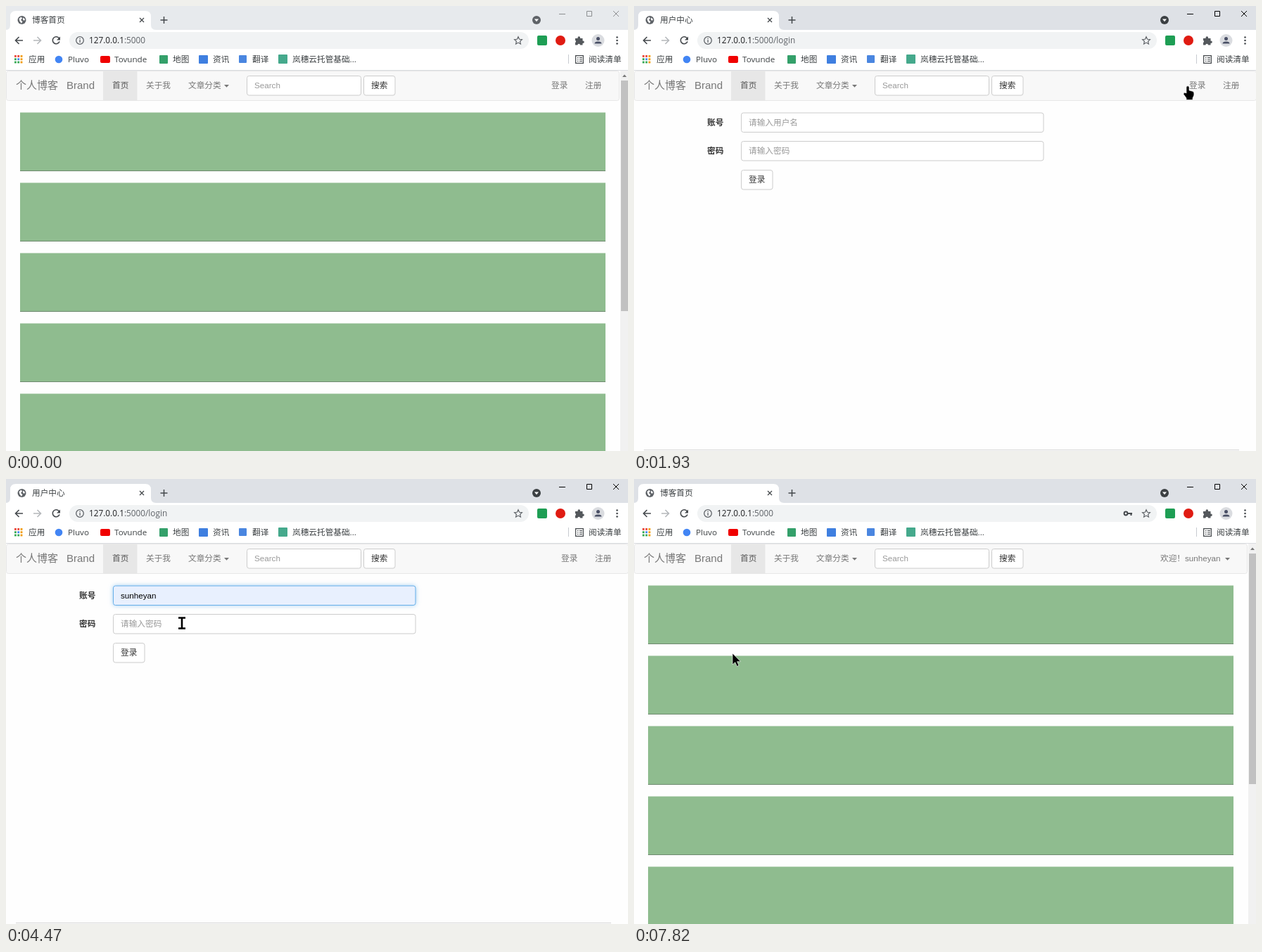
Recreate the animation shown at these times as an HTML page. Size 884 by 633 pixels, loop 8 s.

```html
<!DOCTYPE html>
<html lang="zh-CN">
<head>
<meta charset="utf-8">
<style>
html, body { margin: 0; width: 100%; height: 100%; overflow: hidden; background: #fff; }
svg { display: block; }
text { font: 11.67px "Liberation Sans", "Noto Sans CJK SC", "Noto Sans CJK", sans-serif; fill: #777; white-space: pre; }
.ui { font-family: "Open Sans", "Noto Sans CJK SC", "Noto Sans CJK", sans-serif; fill: #3c4043; }
</style>
</head>
<body>
<svg id="stage" width="884" height="633" viewBox="0 0 884 633"></svg>
<script>
const LOOP = 8000;
const USERS = ['30718264905', 'sunheyan', 'sunheli'];

const rect = (x, y, w, h, fill, more = '') =>
  `<rect x="${x}" y="${y}" width="${w}" height="${h}" fill="${fill}" ${more}/>`;
const dot = (x, y, r, fill, more = '') => `<circle cx="${x}" cy="${y}" r="${r}" fill="${fill}" ${more}/>`;
const fill = (d, color, more = '') => `<path d="${d}" fill="${color}" ${more}/>`;
const line = (d, color, w = 1, more = '') =>
  `<path d="${d}" fill="none" stroke="${color}" stroke-width="${w}" ${more}/>`;
const text = (x, y, s, style = '', more = '') => `<text x="${x}" y="${y}" style="${style}" ${more}>${s}</text>`;
const ui = (x, y, s, style = '', more = '') => text(x, y, s, style, 'class="ui" ' + more);
const group = (id, body, more = '') => `<g id="${id}" ${more}>${body}</g>`;
const box = (x, y, w, h, more = '') =>
  rect(x + .5, y + .5, w - 1, h - 1, '#fff', `rx="3" stroke="#ccc" ${more}`);
const caretDown = x => fill(`M${x} 112h7l-3.5 3.7z`, '#777');

function tabStrip() {
  return rect(0, 0, 884, 34, '#dee1e6', 'id="strip"') +
    fill('M0 34Q6 34 6 27V15Q6 7 14 7H198Q206 7 206 15V27Q206 34 213 34Z', '#fff') +
    group('globe', dot(22.5, 20, 6, '#5f6368') +
      fill('M18.5 18l3-2.5 1.5 2-2 2.5 2.5 2-1.5 2.8-2.5-3zM24 16.5l3 2-1 2.5-2-1.5z', '#fff')) +
    line('M0-6A6 6 0 0 1 5 -3', '#8ab4f8', 1.6, 'id="spinner"') +
    ui(37, 24, '', '', 'id="title"') +
    line('M190 17l6 6m0-6l-6 6', '#45494d', 1.3) +
    line('M219.500 20h10m-5-5v10', '#45494d', 1.5) +
    group('winmenu', dot(754, 20, 6) + fill('M751 18.500h6l-3 3.700z', '#fff')) +
    group('controls', line('M786 11.500h9M825.500 7.500h7v7h-7zM863 7l8 8m0-8l-8 8', 'currentColor'));
}

function toolbar() {
  const ink = '#45494d';
  const puzzle = 'M809 46h3.500v-1a1.800 1.800 0 0 1 3.600 0v1h3.400v3.500h.5a1.800 1.800 0 0 1 0 3.600h-.5v2.400h-3.500a1.800 1.800 0 0 0-3.600 0h-3.400v-3.500a1.800 1.800 0 0 0 0-3.200z';
  return rect(0, 34, 884, 57, '#fff') +
    line('M24 49H13.500m5-5l-5 5 5 5', ink, 1.6) +
    line('M39 49h10.500m-5-5l5 5-5 5', '#b5b8bb', 1.6) +
    group('reload', line('M75.500 46A5 5 0 1 0 76 50.500', ink, 1.6) + fill('M77 43.500v5h-5z', ink)) +
    line('M67 44.500l9 9m0-9l-9 9', ink, 1.6, 'id="stop"') +
    rect(90, 37, 653, 24, '#f1f3f4', 'rx="12"') +
    dot(105, 49, 5.3, 'none', 'stroke="#5f6368" stroke-width="1.3"') +
    rect(104.4, 48, 1.3, 4, '#5f6368') + rect(104.4, 45.7, 1.3, 1.4, '#5f6368') +
    `<text x="118" y="53" class="ui" style="font-size:11.8px;fill:#202124">127.0.0.1<tspan fill="#5f6368" id="path"></tspan></text>` +
    group('key', dot(699, 49, 2.4, 'none', `stroke="${ink}" stroke-width="2"`) +
      line('M702 49h6m-1.500 0v3', ink, 2)) +
    line('M728 43.800l1.600 3.500 3.800.4-2.800 2.600.8 3.800-3.400-2-3.400 2 .8-3.800-2.800-2.600 3.800-.4z', '#5f6368', 1.2) +
    rect(755, 42, 14, 14, '#1e9e54', 'rx="2"') + dot(788, 49, 7, '#e01b12') +
    fill(puzzle, '#54585c') + dot(841.5, 49, 9, '#dadce0') + dot(841.5, 46.5, 2.5, '#4a5066') +
    fill('M836.500 53.500q0-3 5-3t5 3z', '#4a5066') +
    [44.5, 49, 53.5].map(y => dot(868.5, y, 1.3, ink)).join('');
}

function bookmarks() {
  const hues = ['#ea4335', '#ea4335', '#f29900', '#34a853', '#4285f4', '#f29900', '#34a853', '#34a853', '#f29900'];
  const apps = hues.map((c, i) => rect(12 + i % 3 * 4.3, 70 + (i / 3 | 0) * 4.3, 2.8, 2.8, c)).join('');
  const names = [[32, '应用'], [88, 'Pluvo'], [154, 'Tovunde'], [237, '地图'], [294, '资讯'], [350, '翻译'],
    [407, '岚穗云托管基础...'], [828, '阅读清单']];
  return apps + dot(75, 76, 5.3, '#4285f4') + rect(134, 71, 14, 10, '#f00000', 'rx="2"') +
    rect(218, 70, 12, 12, '#34a06a', 'rx="1"') + rect(274, 70, 13, 12, '#3f7fe0', 'rx="1"') +
    rect(331, 70, 11, 11, '#4a86e0', 'rx="1"') + rect(387, 69, 13, 13, '#45a98c', 'rx="1"') +
    names.map(([x, s]) => ui(x, 80, s)).join('') +
    line('M799.500 69v13', '#c8cbd0') +
    line('M809.600 70.600h10.800v10.800h-10.800zM812 73.500h1.500m1.500 0h4M812 76h1.500m1.500 0h4M812 78.500h1.500m1.500 0h4', '#45494d', 1.2) +
    rect(0, 91, 884, 1, '#dadce0');
}

function navbar() {
  const big = 'font-size:15px';
  return rect(.5, 92.5, 871, 42, '#f8f8f8', 'rx="3" stroke="#e7e7e7" id="bar"') +
    rect(138, 92, 48.5, 42, '#e7e7e7') +
    text(14, 118, '个人博客', big) + text(86, 118, 'Brand', big) +
    text(151, 117, '首页', 'fill:#555') + text(199, 117, '关于我') + text(259, 117, '文章分类') + caretDown(310) +
    box(342, 99, 163, 28.5) + text(353, 117, 'Search', 'fill:#999') +
    box(508, 99, 45.5, 28.5) + text(519, 117, '搜索', 'fill:#333') +
    group('guest', text(775, 117, '登录', '', 'id="signin"') + text(823, 117, '注册')) +
    group('member', text(748, 117, '欢迎！' + USERS[1]) + caretDown(840));
}

function homePage() {
  let s = '';
  for (let y = 151.5; y < 633; y += 100)
    s += rect(20, y, 832, 83, '#8fbc8f') + rect(20, y + 82.5, 832, 1, '#6f8a70');
  return s + rect(873, 92, 11, 541, '#f1f1f1') + rect(874, 106, 10, 328, '#c1c1c1') +
    fill('M876 101h6l-3-3.500z', '#777');
}

function loginPage() {
  const bold = 'font-weight:bold;fill:#333';
  const rows = USERS.map((u, i) => rect(151.5, 187 + i * 30, 160, 30, '#e8e8e8', `id="row${i}"`) +
    ui(162, 207 + i * 30, u, 'font-size:12.6px;fill:#202124')).join('');
  return rect(14, 631, 846, 1, '#d4d4d4') +
    text(104, 170, '账号', bold) + text(104, 210, '密码', bold) +
    box(152, 151.5, 430.5, 28.5, 'id="account"') + text(163, 170, '', '', 'id="user"') +
    ui(163, 170, '', 'font-size:10.5px', 'id="preview"') +
    box(152, 192, 430.5, 28.5, 'id="secret"') + text(163, 210, '请输入密码', 'fill:#999', 'id="hint"') +
    group('dots', [0, 1, 2, 3, 4, 5].map(i => dot(165 + i * 4.1, 206.5, 1.45, '#444')).join('')) +
    rect(163, 0, 1, 13, '#000', 'id="caret"') +
    box(152, 233, 45.5, 28.5, 'id="button"') + text(163, 251, '登录', 'fill:#333') +
    rect(154.5, 235.5, 40.5, 23.5, 'none', 'rx="2" stroke="#000" stroke-width="2" id="ring"') +
    group('menu', rect(151, 180.5, 160.5, 104, '#fff', 'rx="2" style="filter:drop-shadow(0 1px 2px #0006)"') + rows);
}

function pointers() {
  const edge = 'stroke="#fff" stroke-width=".6"';
  return group('arrow', fill('M0 0V16L3.800 12.700 6.400 18.500 9 17.300 6.500 11.700H11.500Z', '#000', edge)) +
    group('hand', fill('M-2 1Q0-1.500 2 1V6L7.500 7.500Q9.500 9 8.800 13L7 17V19.500H-2V17L-6 11.500Q-6 8-2 10Z', '#000', edge)) +
    group('beam', line('M-5-7.500H5M-5 7.500H5M0-8V8', '#000', 2.6));
}

document.getElementById('stage').innerHTML = rect(0, 0, 884, 633, '#fefefe') +
  group('home', homePage()) + tabStrip() + toolbar() + bookmarks() + navbar() +
  group('login', loginPage()) + group('pointer', pointers());

const $ = id => document.getElementById(id);
const show = (id, on) => { $(id).style.display = on ? '' : 'none'; };
const put = (id, s) => { if ($(id).textContent !== s) $(id).textContent = s; };

// Pointer moves: start, end, steps, then the points passed through
const MOVES = [
  [200, 330, 3, [598, 595], [602, 584], [607, 572], [613, 560]],
  [470, 1200, 12, [613, 560], [727, 351], [748, 298], [791, 135]],
  [1270, 1270, 1, [791, 135], [791, 126]],
  [1340, 1540, 4, [791, 126], [787, 114]],
  [2010, 2430, 7, [787, 114], [560, 165], [374, 191]],
  [2500, 2560, 2, [374, 191], [384, 170]],
  [2900, 3460, 9, [384, 170], [290, 205], [232, 255]],
  [3520, 3580, 2, [232, 255], [231, 257]],
  [3720, 3790, 2, [231, 257], [232, 248], [233, 238]],
  [4130, 4400, 5, [233, 238], [250, 205]],
  [6670, 6880, 4, [250, 205], [187, 241]],
  [7610, 7610, 1, [187, 241], [183, 243]],
  [7750, 7820, 2, [183, 243], [140, 248]]
];

function pointerAt(t) {
  const move = MOVES.filter(m => t >= m[0]).pop();
  if (!move) return null;
  const [from, to, n, ...pts] = move;
  const step = n > 1 ? Math.floor((t - from) / ((to - from) / (n - 1)) + 1e-6) + 1 : 1;
  const p = Math.min(1, step / n) * (pts.length - 1);
  const i = Math.min(pts.length - 2, Math.floor(p)), f = p - i;
  return [0, 1].map(k => pts[i][k] + (pts[i + 1][k] - pts[i][k]) * f);
}

function focus(id, on) {
  $(id).setAttribute('stroke', on ? '#66afe9' : '#ccc');
  $(id).style.filter = on ? 'drop-shadow(0 0 3px #66afe999)' : '';
}

function draw(t) {
  const home = t < 1880 || t >= 7610;
  const loading = (t >= 1750 && t < 1880) || (t >= 7270 && t < 7610);
  const path = t >= 1750 && t < 7270 ? ':5000/login' : ':5000';
  const active = t >= 1680;

  // Browser frame
  $('strip').setAttribute('fill', active ? '#dee1e6' : '#e7eaed');
  $('controls').style.color = active ? '#000' : '#8c8e90';
  $('winmenu').firstChild.setAttribute('fill', active ? '#3c4043' : '#5f6368');
  put('title', loading ? '127.0.0.1' + path : home ? '博客首页' : '用户中心');
  put('path', path);
  show('globe', !loading);
  show('spinner', loading);
  $('spinner').setAttribute('transform', `translate(22.500 20) rotate(${(t - 7550) * .4 - 40})`);
  show('reload', !loading);
  show('stop', loading);
  show('key', t >= 5190);

  // Page
  show('home', home);
  show('login', !home);
  $('bar').setAttribute('width', home ? 871 : 884);
  show('guest', t < 7610);
  show('member', t >= 7610);
  $('guest').setAttribute('transform', `translate(${home ? 0 : 14} 0)`);
  $('signin').style.fill = t >= 1270 && t < 1880 ? '#333' : '';

  // Pointer
  const at = pointerAt(t);
  const menu = t >= 2700 && t < 4000;
  let kind = 'arrow';
  if (at) {
    const [x, y] = at;
    const inField = x > 152 && x < 582 && ((y > 152 && y < 180) || (y > 192 && y < 220));
    if ((t >= 1270 && t < 2010) || (t >= 6880 && t < 7610)) kind = 'hand';
    else if (!home && inField && !(menu && y > 180)) kind = 'beam';
    $('pointer').setAttribute('transform', `translate(${x} ${y})`);
  }
  show('pointer', at);
  ['arrow', 'hand', 'beam'].forEach(k => show(k, k === kind));

  // Account field and its suggestions
  const over = menu && at[0] < 311 ? Math.floor((at[1] - 187) / 30) : -1;
  const hover = t >= 3720 && t < 3790 ? 2 : over;
  const chosen = t >= 4000;
  show('menu', menu);
  USERS.forEach((u, i) => show('row' + i, i === hover));
  const preview = menu && hover >= 0;
  put('preview', preview ? USERS[hover] : '');
  put('user', chosen ? USERS[1] : preview ? '' : '请输入用户名');
  $('user').style.fill = chosen ? '#000' : '#999';
  $('account').setAttribute('fill', chosen || preview ? '#e8f0fe' : '#fff');
  const inAccount = t >= 2700 && t < 4530;
  const inSecret = t >= 4530 && t < 7140;
  focus('account', inAccount);
  focus('secret', inSecret);

  // Password typing
  const typed = [5190, 5390, 5590, 5860, 6080, 6200].filter(k => t >= k).length;
  show('hint', !typed);
  [...$('dots').children].forEach((d, i) => { d.style.display = i < typed ? '' : 'none'; });
  show('caret', (inAccount && !chosen) || (inSecret && !(t >= 4990 && t < 5190)));
  $('caret').setAttribute('x', inSecret ? 163 + Math.round(typed * 4.1) : 163);
  $('caret').setAttribute('y', inSecret ? 200 : 159);

  // Button
  const hot = t >= 6880;
  $('button').setAttribute('fill', hot ? '#e6e6e6' : '#fff');
  $('button').setAttribute('stroke', hot ? '#adadad' : '#ccc');
  show('ring', t >= 7140);
}

const start = performance.now();
function tick() {
  draw((performance.now() - start) % LOOP);
  requestAnimationFrame(tick);
}
draw(0);
requestAnimationFrame(tick);
</script>
</body>
</html>
```
